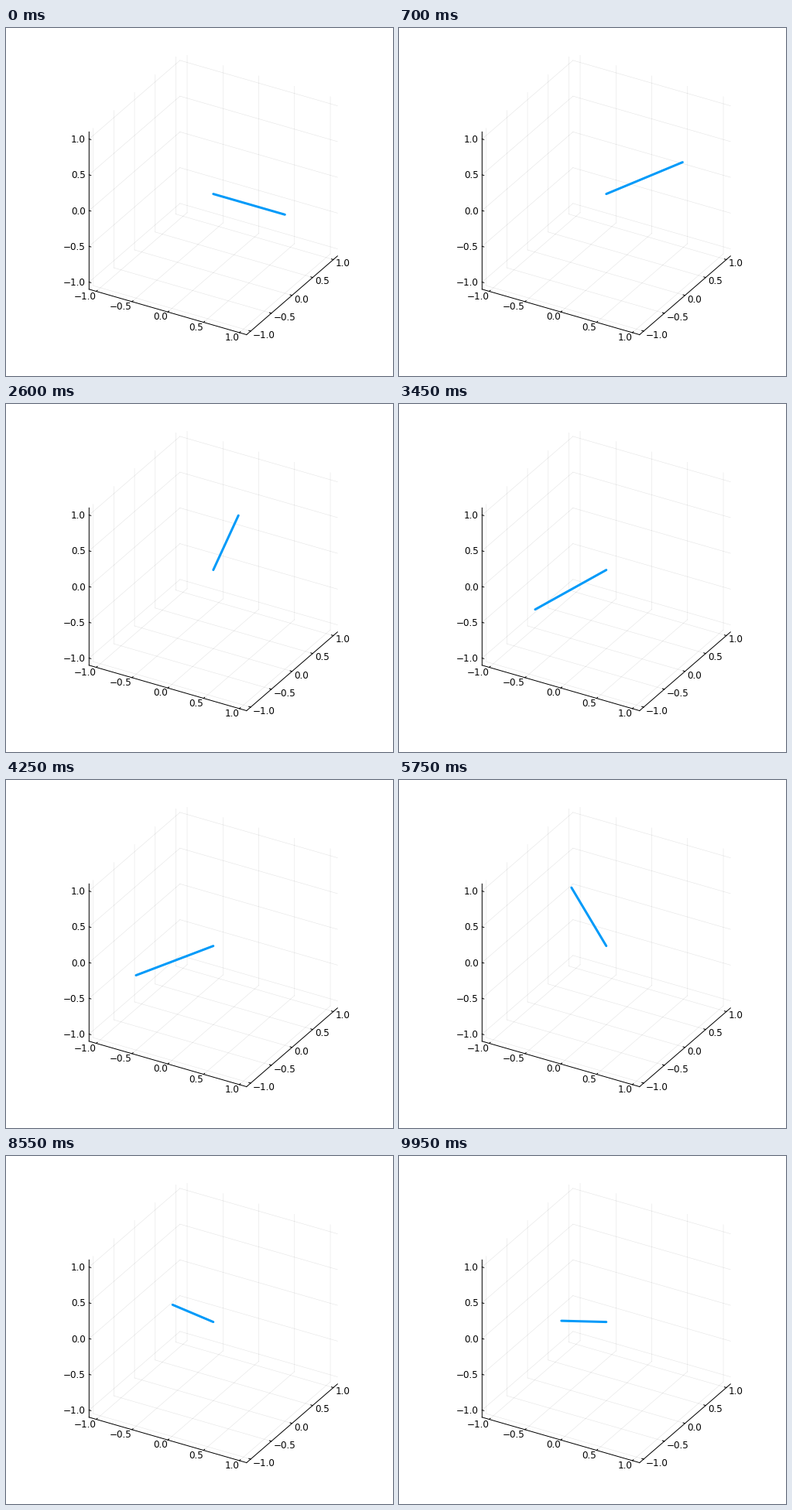
Recreate the animation shown at these times as a matplotlib script. Size 500x450 px, loop 10 s.

```python
import numpy as np
import matplotlib.pyplot as plt
from matplotlib.animation import FuncAnimation

W, H, DPI = 500, 450, 100
PX = 72 / DPI            # one pixel in points
FRAMES, STEP = 200, 50
CENTRE = np.array([267.8, 214.6])
SCALE = 106.8
LIM = 1.1
TICKS = np.linspace(-1, 1, 5)
FONT = 12

# Orthographic camera: azimuth 30 degrees, elevation 30 degrees
S, C = 0.5, np.sqrt(3) / 2
VIEW = SCALE * np.array([[C, S, 0], [S * S, -C * S, -C]])

# Key poses of the arm: seconds, then the tip's offset in pixels
POSES = np.array([
    (0, 92.5, 26.7), (0.95, 99, -36), (1.45, 90.5, 54),
    (2.3, 45, -96), (2.6, 32.5, -70.5), (3.15, -64, 24),
    (4.25, -100, 38), (4.95, -66, -77), (5.75, -45, -75.5),
    (6.6, -30, -100), (7.25, 64, -20.5), (8, -62, -60),
    (9.45, 0, 44), (9.95, -58, -1.5),
])


def project(x, y, z):
    return CENTRE + VIEW @ np.array([x, y, z])


def swing(t):
    """Offset of the tip: a cubic through the poses, kept within arm's length."""
    knots, pos = POSES[:, 0], POSES[:, 1:]
    vel = np.gradient(pos, knots, axis=0)
    i = min(np.searchsorted(knots, t, side="right"), len(knots) - 1) - 1
    h = knots[i + 1] - knots[i]
    s = (t - knots[i]) / h
    ease = s * s * (3 - 2 * s)
    p = (pos[i] + (pos[i + 1] - pos[i]) * ease
         + h * s * (1 - s) * ((1 - s) * vel[i] - s * vel[i + 1]))
    return p * min(1, SCALE / np.hypot(*p))


fig = plt.figure(figsize=(W / DPI, H / DPI), dpi=DPI, facecolor="white")
ax = fig.add_axes([0, 0, 1, 1])
ax.set_xlim(0, W)
ax.set_ylim(H, 0)
ax.axis("off")


def segment(p, q, width=1.0, alpha=1.0):
    (x0, y0), (x1, y1) = project(*p), project(*q)
    ax.plot([x0, x1], [y0, y1], lw=width * PX, color="black",
            alpha=alpha, snap=False)


def grid(p, q):
    segment(p, q, 0.6, 0.1)


def tick(p, step, value, offset, align):
    """Short inward mark on an axis, with its label."""
    segment(p, np.add(p, step))
    x, y = project(*p) + offset
    label = f"{value:.1f}".replace("-", "\u2212")
    ax.text(x, y + 4.4, label, ha=align, va="baseline",
            family="DejaVu Sans", size=FONT * PX, color="black")


L, MARK = LIM, 0.026
for v in TICKS:
    # floor
    grid((v, -L, -L), (v, L, -L))
    grid((-L, v, -L), (L, v, -L))
    # left wall
    grid((-L, v, -L), (-L, v, L))
    grid((-L, -L, v), (-L, L, v))
    # right wall
    grid((v, L, -L), (v, L, L))
    grid((-L, L, v), (L, L, v))
    # axis marks
    tick((v, -L, -L), (0, MARK, 0), v, (0, 5.8), "right")
    tick((L, v, -L), (-MARK, 0, 0), v, (2.9, 4.5), "left")
    tick((-L, -L, v), (MARK, 0, 0), v, (-4.8, 0.2), "right")

segment((-L, -L, -L), (L, -L, -L))
segment((L, -L, -L), (L, L, -L))
segment((-L, -L, -L), (-L, -L, L))

arm, = ax.plot([], [], color="#009AF9", lw=3 * PX,
               solid_capstyle="round", snap=False, zorder=5)


def update(n):
    x, y = CENTRE + swing(n * STEP / 1000)
    arm.set_data([CENTRE[0], x], [CENTRE[1], y])
    return arm,


anim = FuncAnimation(fig, update, frames=FRAMES, interval=STEP,
                     repeat=True, repeat_delay=0)
plt.show()
```
